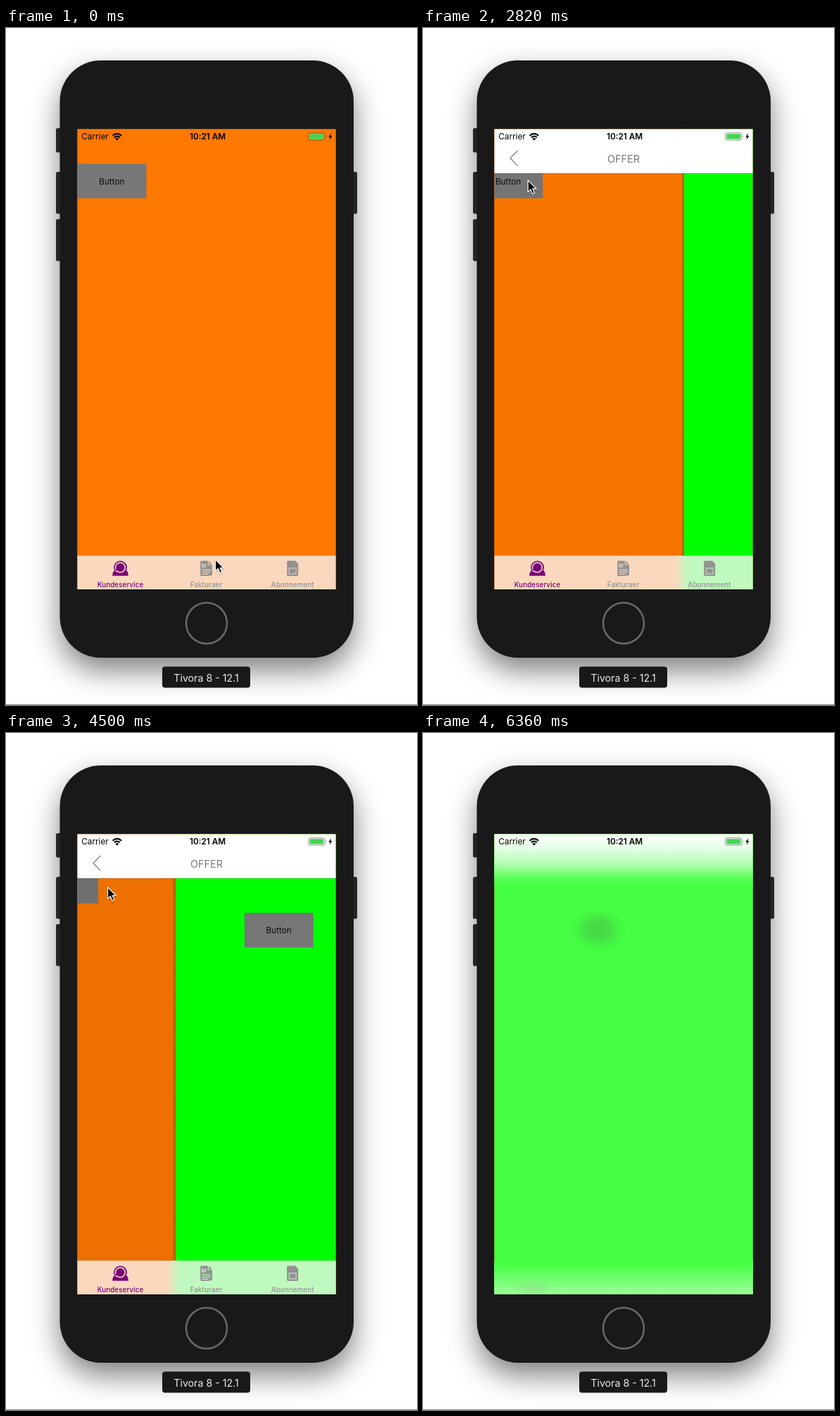
Animation, 584 px wide and 960 px high, one loop 7080 ms. Source, as an HTML page:

```html
<!DOCTYPE html>
<html lang="en">
<head>
<meta charset="utf-8">
<title>Tab and navigation demo</title>
<style>
html, body { margin: 0; width: 100%; height: 100%; overflow: hidden; background: #fff; }
svg { display: block; width: 584px; height: 960px; }
text { font-family: Inter, "Open Sans", sans-serif; text-anchor: middle; }
.device { fill: #191919; }
.key { fill: #252525; }
.btn { font-size: 11.75px; fill: #0c0c0c; }
.tab { color: #929292; fill: currentColor; }
.tab.on { color: #780078; }
.tab text { font-size: 9.8px; font-weight: 500; letter-spacing: .1px; }
#title { font-size: 16.5px; font-weight: 500; fill: #080808; }
#title.sub { font-size: 14.4px; font-weight: 400; fill: #777; }
</style>
</head>
<body>
<svg viewBox="0 0 584 960">
  <defs>
    <filter id="soft" x="-30%" y="-20%" width="160%" height="140%"><feGaussianBlur stdDeviation="21"/></filter>
    <filter id="drop" x="-50%" y="-50%" width="200%" height="200%"><feDropShadow dx="0" dy="1" stdDeviation=".8" flood-opacity=".35"/></filter>
    <clipPath id="screen"><rect x="101.5" y="143.5" width="367" height="652.5"/></clipPath>
    <clipPath id="sheetClip"><rect id="sheetBox" x="101" y="143" width="368" height="653"/></clipPath>
    <linearGradient id="fade"><stop offset="0" stop-color="#c0f9c0" stop-opacity="0"/><stop offset="1" stop-color="#c0f9c0"/></linearGradient>
    <linearGradient id="edge"><stop offset="0" stop-opacity="0"/><stop offset="1" stop-opacity=".3"/></linearGradient>
    <linearGradient id="topGlow" x1="0" y1="0" x2="0" y2="1">
      <stop offset="0" stop-color="#fdfffd"/><stop offset=".25" stop-color="#e9fee9"/><stop offset=".6" stop-color="#b2feb1"/>
      <stop offset=".85" stop-color="#60ff5e"/><stop offset="1" stop-color="#44ff42"/>
    </linearGradient>
    <linearGradient id="lowGlow" x1="0" y1="0" x2="0" y2="1">
      <stop offset="0" stop-color="#44ff42"/><stop offset=".45" stop-color="#6cff69"/><stop offset="1" stop-color="#9dfd99"/>
    </linearGradient>
    <radialGradient id="smudge">
      <stop offset="0" stop-color="#46d645"/><stop offset=".4" stop-color="#46dd45" stop-opacity=".9"/><stop offset="1" stop-color="#44ff42" stop-opacity="0"/>
    </radialGradient>
    <radialGradient id="smudge2"><stop offset="0" stop-color="#8ae088" stop-opacity=".7"/><stop offset="1" stop-color="#8ae088" stop-opacity="0"/></radialGradient>
    <mask id="agentCut" maskUnits="userSpaceOnUse" x="-14" y="750" width="28" height="30">
      <rect x="-14" y="750" width="28" height="30" fill="#fff"/>
      <path d="M-6.6 767.5A6.9 6.9 0 1 1 4.4 770.2Q2 772.6-2 771.4L-7 769.5" fill="none" stroke="#000" stroke-width="1.6"/>
    </mask>
    <mask id="billCut" maskUnits="userSpaceOnUse" x="-14" y="750" width="28" height="30">
      <rect x="-14" y="750" width="28" height="30" fill="#fff"/>
      <path d="M-6 768.3H6M-6 771.3H6M-6 774.3H3M3 754V761H9" fill="none" stroke="#000" stroke-width="1.2"/>
      <text x="-2.8" y="765.4" font-size="7.4" font-weight="700">kr</text>
    </mask>
    <mask id="simCut" maskUnits="userSpaceOnUse" x="-14" y="750" width="28" height="30">
      <rect x="-14" y="750" width="28" height="30" fill="#fff"/>
      <rect x="-5" y="766" width="10" height="8" fill="none" stroke="#000" stroke-width="1.3" stroke-dasharray="2 1"/>
    </mask>
  </defs>

  <rect width="584" height="960" fill="#fff"/>
  <rect x="77" y="64" width="417" height="847" rx="58" opacity=".5" filter="url(#soft)"/>
  <path d="M0 959.5H584" stroke="#858585"/>
  <g class="key">
    <rect x="71" y="142" width="9" height="34.500" rx="2.500"/>
    <rect x="71" y="204" width="9" height="59.500" rx="2.500"/>
    <rect x="71" y="271" width="9" height="59.500" rx="2.500"/>
    <rect x="490" y="204" width="9" height="59.500" rx="2.500"/>
  </g>
  <rect class="device" x="76.500" y="46" width="417.500" height="847" rx="58"/>
  <circle cx="285" cy="844" r="29" fill="none" stroke="#686868" stroke-width="2.500"/>
  <rect class="device" x="222" y="905.500" width="125" height="30" rx="4"/>
  <text x="284.500" y="926.500" font-size="14.200" fill="#ebebeb">Tivora 8 - 12.1</text>

  <g clip-path="url(#screen)">
    <rect id="flat" x="101" y="143" width="368" height="653"/>
    <g id="home">
      <rect x="101" y="143" width="368" height="653" fill="#ff7800"/>
      <rect x="101.500" y="192.500" width="98" height="49" fill="#777"/>
      <text class="btn" x="150.300" y="221.500">Button</text>
    </g>
    <rect id="dim" x="101" y="143" width="368" height="653"/>
    <g id="offer">
      <rect x="97" y="143" width="4.500" height="653" fill="url(#edge)"/>
      <rect x="101.500" y="143" width="368" height="653" fill="#0f0"/>
      <rect x="199.500" y="255" width="98" height="49" fill="#777"/>
      <text class="btn" x="248.300" y="284">Button</text>
    </g>

    <rect id="bar" x="101" y="748" width="368" height="48"/>
    <g id="barOffer">
      <rect x="89" y="748" width="18" height="48" fill="url(#fade)"/>
      <rect x="107" y="748" width="368" height="48" fill="#c0f9c0"/>
    </g>
    <path d="M101 748.200H469" stroke="#000" stroke-opacity=".2" stroke-width=".6"/>
    <g class="tab" transform="translate(162.500 0)">
      <path mask="url(#agentCut)" d="M-9.500 766A9.500 10 0 1 1 9.500 765L8.500 769Q11.300 771 11.300 776.800H-11.300Q-11.300 771-8 769.300Z"/>
      <text y="792.500">Kundeservice</text>
    </g>
    <g class="tab" transform="translate(284.500 0)">
      <path mask="url(#billCut)" d="M-6.700 755.500H3.500L8.500 760.800V775.500Q8.500 777-7 777H-6.700Q-8.300 777-8.300 775.500V757Q-8.300 755.500-6.700 755.500Z"/>
      <text y="792.500">Fakturaer</text>
    </g>
    <g class="tab" transform="translate(407.200 0)">
      <path mask="url(#simCut)" d="M-6.500 755.500H3.800L8 759.800V775.500Q8 777 6.500 777H-6.500Q-8 777-8 775.500V757Q-8 755.500-6.500 755.500Z"/>
      <text y="792.500">Abonnement</text>
    </g>

    <g id="nav">
      <rect x="101" y="143" width="368" height="63" fill="#fff"/>
      <path d="M101 206.300H469" stroke="#000" stroke-opacity=".3" stroke-width=".6"/>
      <text id="title" x="285" y="191"></text>
      <path id="back" d="M134.500 173.800L123.800 184.500L134.500 195.300" fill="none" stroke="#777" stroke-width="1.200"/>
    </g>

    <g id="sheet" clip-path="url(#sheetClip)">
      <rect x="101" y="143" width="368" height="653" fill="#44ff42"/>
      <rect x="101" y="143" width="368" height="72" fill="url(#topGlow)"/>
      <rect x="101" y="752" width="368" height="44" fill="url(#lowGlow)"/>
      <ellipse cx="249" cy="279" rx="47" ry="35" fill="url(#smudge)"/>
      <ellipse cx="157" cy="787" rx="30" ry="14" fill="url(#smudge2)"/>
    </g>

    <g>
      <text x="126.500" y="158" font-size="11.750">Carrier</text>
      <text x="286.500" y="158" font-size="11.750" font-weight="600">10:21 AM</text>
      <g fill="none" stroke="#000" stroke-width="2">
        <path d="M151.500 152.700Q157.800 147 164.200 152.700M153.800 155.300Q157.800 151.700 161.900 155.300"/>
      </g>
      <path d="M155.400 156.900Q157.800 155 160.300 156.900L157.800 159.500Z"/>
      <rect x="429.800" y="148.800" width="23" height="10.200" rx="2.500" fill="#fff" fill-opacity=".25" stroke="#000" stroke-opacity=".5" stroke-width=".9"/>
      <rect x="431.400" y="150.300" width="19.800" height="7.200" rx="1.200" fill="#43d551"/>
      <path d="M454 152.200Q455.500 153.900 454 155.600Z" fill-opacity=".6"/>
      <path d="M462 149.300L458.300 154.500H460.600L459.700 158.500L463.500 153.200H461.200Z"/>
    </g>
  </g>

  <g id="cursor" filter="url(#drop)">
    <path d="M0 0V16.500L3.800 13L6.600 19.300L9.400 18.100L6.700 12H11.700Z" stroke="#fff" stroke-width="1.200"/>
  </g>
</svg>

<script>
const LOOP = 7080, STEP = 60, WIDTH = 367, TOP = 143.3, HEIGHT = 652.7;
const PUSH_1 = 2765, POP = 3650, PUSH_2 = 4385, SHEET = 5235, CURSOR_OUT = 6300;

const $ = id => document.getElementById(id);
const tabs = [...document.querySelectorAll('.tab')];

const pages = [
  { from: 0, tab: 0, title: '', fill: '#ff7800', bar: '#fad8be' },
  { from: 300, tab: 1, title: 'FAKTURAER', fill: '#ff2600', bar: '#fac2bf' },
  { from: 930, tab: 2, title: 'ABONNEMENT', fill: '#1400ff', bar: '#c0bff9' },
  { from: 1800, tab: 0, title: '', fill: '#ff7800', bar: '#fad8be' }
];

// time, x, y
const path = [
  [0, 297.5, 753.5], [240, 288, 767], [600, 288, 768], [900, 403.5, 764], [1080, 403.5, 764],
  [1440, 398, 785], [1740, 168, 773], [1860, 168, 771], [2280, 195.5, 180.5], [2580, 150, 215],
  [2880, 149, 216], [3240, 143, 189], [3420, 142.5, 187], [3540, 131, 183], [3780, 131, 184],
  [4140, 144, 217], [4500, 144.5, 218.5], [4800, 146, 219], [5160, 257.5, 282], [5820, 257.5, 282],
  [6240, 496, 112]
];

// Critically damped spring used by system transitions
function spring(ms) {
  if (ms <= 0) return 0;
  const u = 0.01826 * ms;
  return 1 - (1 + u) * Math.exp(-u);
}

function cursorAt(t) {
  const i = path.findIndex(p => p[0] > t);
  if (i < 0) return path[path.length - 1].slice(1);
  const [t0, x0, y0] = path[i - 1], [t1, x1, y1] = path[i];
  const k = (t - t0) / (t1 - t0), e = k * k * (3 - 2 * k);
  return [x0 + (x1 - x0) * e, y0 + (y1 - y0) * e];
}

function pushed(t) {
  if (t < POP) return spring(t - PUSH_1);
  if (t < PUSH_2) return 1 - spring(t - POP);
  return spring(t - PUSH_2);
}

const show = (id, on) => $(id).setAttribute('visibility', on ? 'visible' : 'hidden');
const move = (id, x, y = 0) => $(id).setAttribute('transform', `translate(${x} ${y})`);

function render(t) {
  const page = pages.filter(p => p.from <= t).pop();
  const p = pushed(t);
  const offerNav = (t >= PUSH_1 && t < POP) || t >= PUSH_2;
  const title = offerNav ? 'OFFER' : page.title;

  tabs.forEach((tab, i) => tab.classList.toggle('on', i === page.tab));
  $('flat').setAttribute('fill', page.fill);
  $('bar').setAttribute('fill', page.bar);

  show('home', page.tab === 0);
  move('home', -0.3 * WIDTH * p);
  $('dim').setAttribute('opacity', 0.11 * p);
  for (const id of ['offer', 'barOffer']) {
    show(id, p > 0);
    move(id, WIDTH * (1 - p));
  }

  show('nav', title);
  $('title').textContent = title;
  $('title').classList.toggle('sub', offerNav);
  $('back').setAttribute('opacity', !offerNav ? 0 : t >= 3540 && t < POP ? 0.4 : 1);

  show('sheet', t >= SHEET);
  $('sheetBox').setAttribute('y', TOP + HEIGHT * (1 - spring(t - SHEET)));

  show('cursor', t < CURSOR_OUT);
  move('cursor', ...cursorAt(t));
}

const start = performance.now();
function tick() {
  const t = (performance.now() - start) % LOOP;
  render(Math.floor(t / STEP) * STEP);
  requestAnimationFrame(tick);
}
tick();
</script>
</body>
</html>
```
